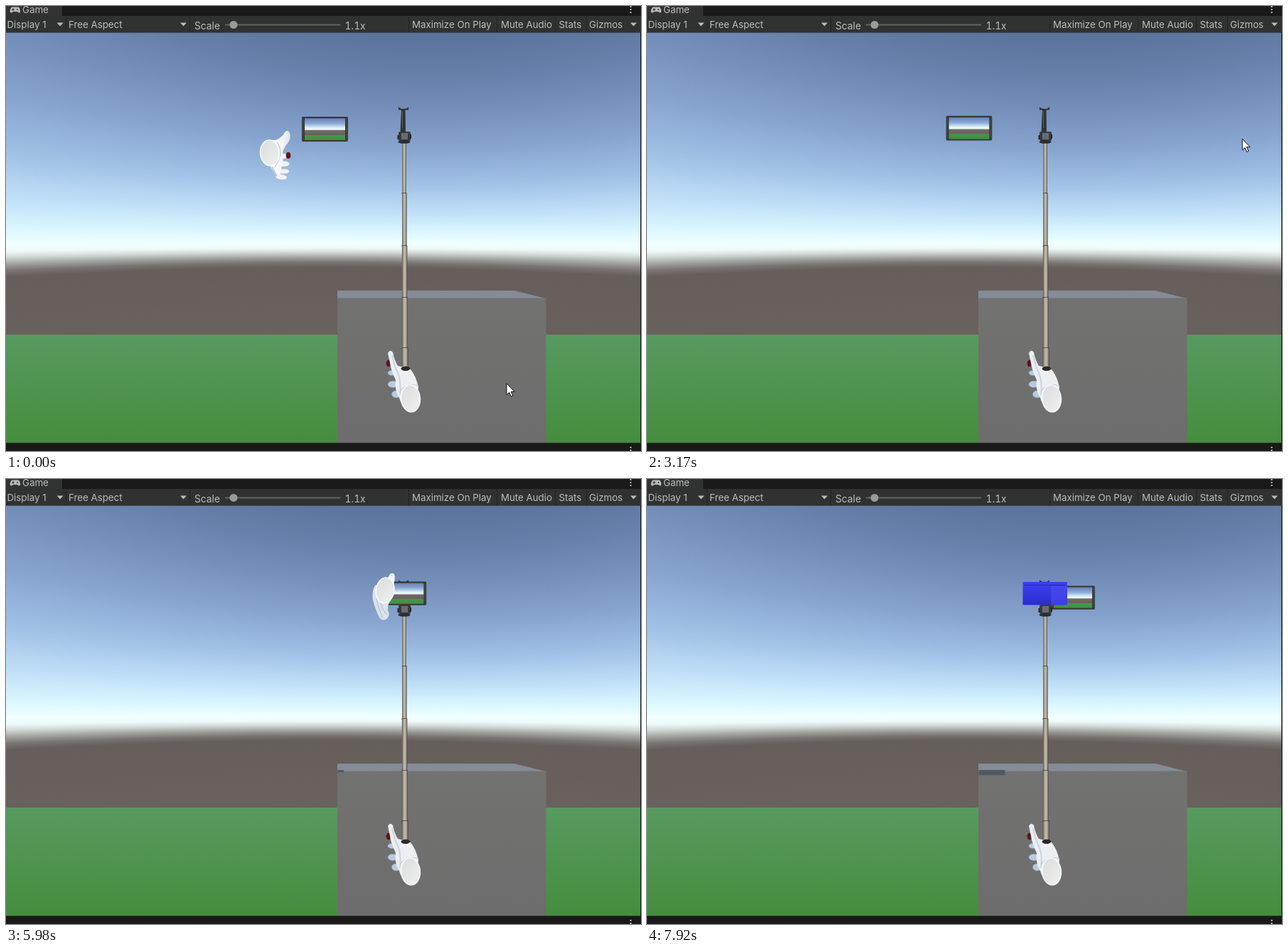
An HTML page with a canvas for the animation above (7.99 s loop, 893x627 px).

```html
<!DOCTYPE html>
<html lang="en">
<head>
<meta charset="utf-8">
<title>Phone on a stick</title>
<style>
  html, body { margin: 0; width: 100%; height: 100%; overflow: hidden; background: #191919; }
  canvas, svg { position: absolute; left: 0; top: 0; width: 893px; height: 627px; }
  text { font: 13.3px Inter, Roboto, sans-serif; fill: #bcbdbc; }
  .zoom { font-size: 13.8px; font-variant-numeric: tabular-nums; }
</style>
</head>
<body>
<canvas id="sky" width="893" height="627"></canvas>
<svg viewBox="0 0 893 627">
  <defs>
    <linearGradient id="grass" x2="0" y2="1">
      <stop stop-color="#589a60"/><stop offset="1" stop-color="#458d3d"/>
    </linearGradient>
    <linearGradient id="front" x2="0" y2="1">
      <stop stop-color="#727271"/><stop offset="1" stop-color="#6d6d6d"/>
    </linearGradient>
    <linearGradient id="rod">
      <stop stop-color="#57544e"/><stop offset=".25" stop-color="#a29d91"/>
      <stop offset=".5" stop-color="#c6c0b2"/><stop offset=".75" stop-color="#a39d8f"/>
      <stop offset="1" stop-color="#45423d"/>
    </linearGradient>
    <linearGradient id="glove">
      <stop stop-color="#f2f4f5"/><stop offset=".7" stop-color="#f4f5f7"/>
      <stop offset="1" stop-color="#e0e5ea"/>
    </linearGradient>
    <linearGradient id="cuff" x2=".6" y2="1">
      <stop stop-color="#d9dddd"/><stop offset="1" stop-color="#eceeec"/>
    </linearGradient>
    <linearGradient id="screen" x2="0" y2="1">
      <stop stop-color="#6580b0"/><stop offset=".25" stop-color="#8fadd6"/>
      <stop offset=".45" stop-color="#e0f5fc"/><stop offset=".52" stop-color="#f0f8f8"/>
      <stop offset=".56" stop-color="#706966"/><stop offset=".76" stop-color="#68615e"/>
      <stop offset=".77" stop-color="#46984a"/><stop offset="1" stop-color="#3f8f3d"/>
    </linearGradient>
    <linearGradient id="blue" x2="0" y2="1">
      <stop stop-color="#3d40ec"/><stop offset="1" stop-color="#2b2bd2"/>
    </linearGradient>
    <filter id="soft"><feGaussianBlur stdDeviation=".7"/></filter>
  </defs>

  <!-- Ground and block -->
  <rect y="463" width="892" height="153" fill="url(#grass)"/>
  <path d="M466 401H715L759 412H466Z" fill="#858b97"/>
  <path d="M466 411.5H759.5V616H466Z" fill="url(#front)"/>
  <rect id="shade" x="466.5" fill="#46525f" opacity=".8" filter="url(#soft)"/>

  <!-- Free hand, reaching -->
  <g id="reach">
    <g fill="#f0f2f5" stroke="#a9b3c0" stroke-width=".7">
      <ellipse cx="16" cy="34" rx="8.5" ry="4" transform="rotate(6 16 34)"/>
      <ellipse cx="20" cy="26" rx="7.500" ry="3.800"/>
      <ellipse cx="20" cy="15.500" rx="8" ry="4"/>
      <ellipse cx="19" cy="4.500" rx="6" ry="4"/>
    </g>
    <path d="M-11-12Q-2-19 8-18Q18-22 21-29Q25-34 28-28Q30-21 26-15Q20-8 18-1Q20 8 17 17L15 31Q11 36 7 29Q2 22 0 17Z" fill="url(#glove)"/>
    <path d="M10-15Q15-8 15 2Q13 13 7 20" fill="none" stroke="#b6bdc6"/>
    <path d="M3 20Q7 28 10 33" fill="none" stroke="#c3cad2" stroke-width="2"/>
    <ellipse id="nail" cx="26" cy="3.500" rx="3.300" ry="4.600"/>
    <ellipse rx="13.400" ry="18" transform="rotate(-6)" fill="url(#cuff)" stroke="#fafbfb" stroke-width="1.500"/>
  </g>

  <!-- Clamp behind the phone -->
  <path d="M552 142Q554 145 559 145Q564 145 566 142V146.500H561.500L562 177H554.500L556 146.500H552Z" fill="#303336"/>
  <path d="M557.500 148V172" stroke="#5d6266"/>

  <g id="phone">
    <rect x="-32.500" y="-17.500" width="65" height="35" rx="2" fill="#353735"/>
    <path d="M-31-15V15M31-15V15" stroke="#515451"/>
    <rect x="-28.500" y="-15.300" width="57" height="30.800" fill="url(#screen)"/>
  </g>
  <g id="ghost">
    <rect x="528.500" y="145" width="62.500" height="32.500" rx="1" fill="url(#blue)"/>
    <path d="M530 149.500H588" stroke="#2526bd" stroke-width="1.200"/>
    <rect id="overlap" fill="#5558f5" opacity=".45"/>
  </g>

  <!-- Stick -->
  <g id="stick"></g>
  <g>
    <rect x="552" y="177" width="17" height="13" rx="2" fill="#383b3e"/>
    <rect x="556" y="179" width="9" height="9" fill="#686c70"/>
    <path d="M551.500 182v6M569 181v6" stroke="#222427" stroke-width="2"/>
    <ellipse cx="560" cy="191.500" rx="8.500" ry="2.300" fill="#2a2c2e"/>
  </g>

  <!-- Hand on the grip -->
  <g>
    <g fill="#b9cbe0" stroke="#96a9c0" stroke-width=".6">
      <ellipse cx="543" cy="517" rx="6" ry="3.500"/><ellipse cx="544" cy="533" rx="7" ry="4.500"/>
      <ellipse cx="549" cy="547" rx="6.500" ry="5"/>
    </g>
    <ellipse cx="538" cy="503.500" rx="3.400" ry="4.800" fill="#65101a"/>
    <path d="M537 489Q540 483 544 488Q546 499 551 507L568 511Q577 521 580 538L572 571Q557 568 553 552Q546 541 548 527Q541 512 540 503Z" fill="#eceff2"/>
    <path d="M543 492Q546 507 551 517Q556 529 554 548" fill="none" stroke="#cbd4de" stroke-width="2"/>
    <ellipse cx="562" cy="511" rx="6.500" ry="3.200" fill="#2b2a2a"/>
    <path d="M555 512Q562 517 568 512L570 518H556Z" fill="#f0f2f4"/>
    <path d="M554 543Q563 530 580 535" fill="none" stroke="#c8ced5" stroke-width="1.400"/>
    <ellipse cx="569" cy="553" rx="13.300" ry="19" transform="rotate(-5 569 553)" fill="url(#cuff)" stroke="#f8f9f9" stroke-width="1.600"/>
  </g>

  <!-- Free hand, over the mounted phone -->
  <g id="release" transform="translate(533 157)">
    <path d="M-13-8Q-19-1-17 14Q-14 25-10 34Q-6 44 1 41Q8 36 4 28Q3 21 8 14Z" fill="#dbe2ea"/>
    <path d="M-13 4Q-11 22-4 38M-6 18Q-4 26 2 34" fill="none" stroke="#aeb9c8"/>
    <path d="M0-15Q5-18 6-22Q9-26 13-23Q15-18 12-8Z" fill="#f1f3f5"/>
    <ellipse rx="12.800" ry="18" transform="rotate(9)" fill="url(#cuff)" stroke="#fafbfb" stroke-width="1.500"/>
  </g>

  <!-- Window frame -->
  <path d="M0 0H893V37.500H0ZM0 615.500H893V627H0ZM892 37H893V616H892Z" fill="#191919"/>
  <path d="M0 0H79V14H0Z" fill="#313331"/>
  <path d="M0 14H893V37H0Z" fill="#2f3230"/>
  <path d="M84.500 15V37M258.500 15V37M566.500 15V37M690.500 15V37M772.500 15V37M816.500 15V37" stroke="#202220"/>
  <g fill="#b9bab9">
    <path d="M9 1.500H17Q20 2 20 8Q19 11 16 8H10Q7 11 5.500 8Q6 2 9 1.500Z"/>
    <path d="M71.500 23.500h9l-4.500 5zM245 23.500h9l-4.500 5zM878 23.500h9l-4.500 5z"/>
    <path d="M877.500 0h2v2h-2zM877.500 4h2v2h-2zM877.500 8h2v2h-2zM877.500 621h2v2h-2zM877.500 625h2v2h-2z"/>
  </g>
  <path d="M8 5h4M10 3v4" stroke="#313331"/>
  <circle cx="16" cy="5" r="1" fill="#313331"/>
  <path d="M308 26.500H470" stroke="#626462" stroke-width="2"/>
  <circle cx="320" cy="26.500" r="5.500" fill="#999b99"/>
  <g id="labels"></g>

  <path id="cursor" d="M0 0V16L3.700 12.600L6.400 18.400L8.800 17.300L6.200 11.600H11Z" fill="#fff" stroke="#111" stroke-width="1"/>
</svg>
<script>
const $ = id => document.getElementById(id);
const LOOP = 7990;
const MOUNT = [560.3, 161.2];

// Sky bands bend with the view angle, so each column stretches about the horizon.
// The sky's darkest point lies right of the centre.
function paintSky() {
  const ctx = $('sky').getContext('2d');
  const horizon = 327, focal = 500, top = 37, span = 427;
  const bands = [[37, '#5a729b'], [100, '#6680aa'], [150, '#7590bb'], [200, '#87a4cf'],
    [250, '#a0c0e5'], [290, '#bfdff7'], [318, '#daf6fe'], [334, '#f1ffff'], [341, '#eefaf8'],
    [347, '#d3d9d6'], [354, '#a4a5a2'], [361, '#7b7673'], [368, '#655e5b'], [464, '#6a625e']];
  for (let x = 0; x < 892; x++) {
    const stretch = middle => Math.hypot(1, (x - middle) / focal);
    const above = stretch(600), below = stretch(446);
    const at = y => horizon + (y - horizon) * (y < horizon ? above : below);
    const start = at(top), end = at(top + span);
    const g = ctx.createLinearGradient(0, start, 0, end);
    for (const [y, color] of bands) g.addColorStop((at(y) - start) / (end - start), color);
    ctx.fillStyle = g;
    ctx.fillRect(x, top, 1, span);
  }
}

function buildStatic() {
  const joints = [193, 264, 338, 411, 482, 511];
  $('stick').innerHTML = joints.slice(1).map((end, i) => {
    const start = joints[i], x = 557.3 - i * 0.2, w = 5.6 + i * 0.9;
    const ring = i < 4 ? `<rect x="${x - 0.5}" y="${end - 0.7}" width="${w + 1}" height="1.5" fill="#35332f"/>` : '';
    return `<rect x="${x}" y="${start}" width="${w}" height="${end - start}" fill="url(#rod)"/>${ring}`;
  }).join('');

  const labels = [['Game', 23, 10], ['Display 1', 1.5, 31], ['Free Aspect', 88, 31],
    ['Scale', 265, 32.5, 'zoom'], ['1.1x', 476.5, 32.5, 'zoom'], ['Maximize On Play', 571, 31],
    ['Mute Audio', 696, 31], ['Stats', 777.5, 31], ['Gizmos', 820, 31]];
  $('labels').innerHTML = labels.map(([s, x, y, kind = '']) =>
    `<text x="${x}" y="${y}" class="${kind}">${s}</text>`).join('');
}

// Each key is [time, ...values]. The curve keeps its speed through keys
// and rests only where it turns back or holds.
function track(keys, t) {
  const last = keys.length - 1;
  let i = 0;
  while (i < last - 1 && t >= keys[i + 1][0]) i++;
  const a = keys[i], b = keys[i + 1], dt = b[0] - a[0];
  const u = Math.min(1, Math.max(0, (t - a[0]) / dt));
  const slope = (k, n) => (keys[k + 1][n] - keys[k][n]) / (keys[k + 1][0] - keys[k][0]);
  const tangent = (k, n) => {
    if (k === 0) return slope(0, n);
    if (k === last) return slope(last - 1, n);
    const p = slope(k - 1, n), q = slope(k, n);
    return p * q > 0 ? 2 * p * q / (p + q) : 0;
  };
  return a.slice(1).map((v, j) => {
    const n = j + 1, w = 1 - u;
    return v * w * w * (1 + 2 * u) + b[n] * u * u * (3 - 2 * u)
      + dt * u * w * (tangent(i, n) * w - tangent(i + 1, n) * u);
  });
}

const handKeys = [[0, 371, 207, 1], [910, 371, 186, 1], [1670, 384, 175, .97],
  [2110, 403, 165, .93], [2340, 403, 165, .93], [3100, 420, 169, .93]];
const phoneKeys = [[3100, 448.5, 173.5, 1], [3940, 501.5, 159, .95], [4650, ...MOUNT, .95],
  [6060, ...MOUNT, .95], [6130, 551, 160.5, .95], [6500, 551, 160.5, .95],
  [7240, 552, 202.5, .95], [7920, 599, 167, .95]];
const cursorKeys = [[0, 704, 532], [500, 711, 440], [910, 701, 362], [1300, 738, 338],
  [1670, 769, 312], [2110, 818.5, 193], [2340, 818.5, 193], [3100, 834, 188], [3600, 873, 178]];

const during = (t, from, to) => t >= from && t < to;
const show = (id, on) => $(id).setAttribute('visibility', on ? 'visible' : 'hidden');
const place = (id, [x, y, s = 1]) => $(id).setAttribute('transform', `translate(${x} ${y}) scale(${s})`);
function setRect(id, attrs) {
  for (const key in attrs) $(id).setAttribute(key, attrs[key]);
}

function draw(t) {
  const phone = track(phoneKeys, t), [px, py] = phone;
  const near = Math.hypot(px - MOUNT[0], py - MOUNT[1]) < 41;
  place('phone', phone);
  place('reach', track(handKeys, t));
  place('cursor', track(cursorKeys, t));
  show('reach', t < 3100);
  show('release', during(t, 4650, 6060));
  show('ghost', near && (t < 4650 || t > 7240));
  show('cursor', t < 3600);
  $('nail').setAttribute('fill', t < 450 ? '#65101a' : '#e81414');

  // Part of the held phone that lies behind the highlight
  const left = Math.max(529, px - 31), right = Math.min(591, px + 31);
  const high = Math.max(145, py - 16), low = Math.min(177.5, py + 16);
  setRect('overlap', { x: left, y: high, width: Math.max(0, right - left), height: Math.max(0, low - high) });

  // The phone's shadow creeps in over the block's left edge
  const bottom = 413 + (py - 161) * 0.7, top = Math.max(410, bottom - 24);
  setRect('shade', { y: top, width: Math.max(0, 8 + (px - 560) * 0.74), height: Math.max(0, bottom - top) });
}

paintSky();
buildStatic();
const begin = performance.now();
function tick() {
  draw((performance.now() - begin) % LOOP);
  requestAnimationFrame(tick);
}
tick();
</script>
</body>
</html>
```
